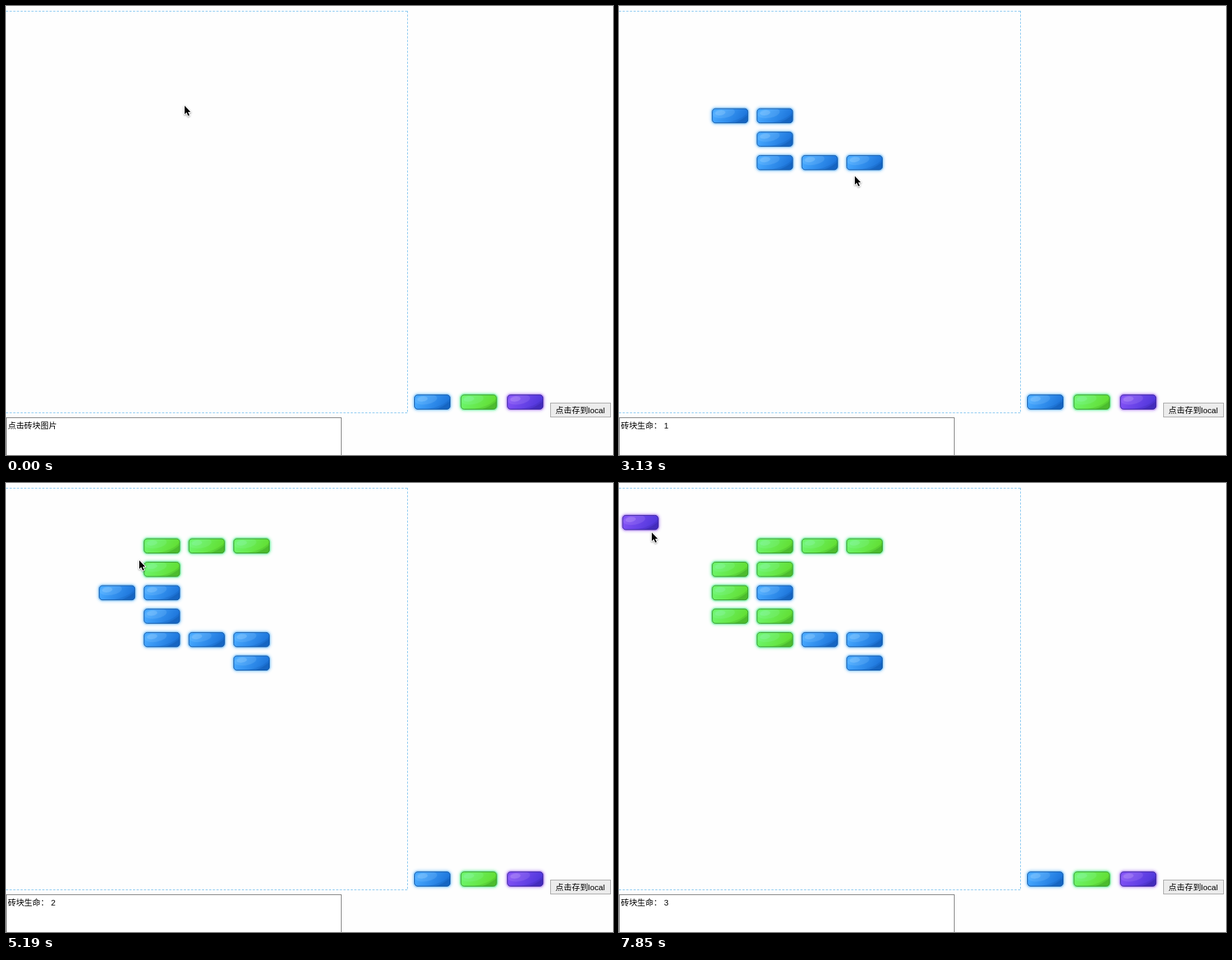
Recreate the animation shown at these times as an HTML page with a canvas. Size 870 by 644 pixels, loop 8000 ms.

```html
<!DOCTYPE html>
<html lang="zh-CN">
<head>
<meta charset="utf-8">
<style>
  html, body { margin: 0; width: 100%; height: 100%; overflow: hidden; background: #fefefe; }
  canvas { display: block; }
</style>
</head>
<body>
<canvas id="stage" width="870" height="644"></canvas>
<script>
const ctx = document.getElementById('stage').getContext('2d');
const LOOP = 8000, TICK = 148, LAST_TICK = 53;
const CELL_W = 64.25, CELL_H = 33.6, TOP = 7.5;
const BRICK_W = 52, BRICK_H = 21.5;
const FONT = '11.7px "Liberation Sans", "Noto Sans CJK SC", "Noto Sans CJK", sans-serif';

const SKINS = {
  blue:   { light: '#46a8ff', dark: '#1c74da', edge: '#0f55a6', glow: '#a9d7fa' },
  green:  { light: '#6cf56a', dark: '#62de32', edge: '#36962a', glow: '#98f4ba' },
  purple: { light: '#8150f5', dark: '#4f36da', edge: '#37219c', glow: '#cdb0f7' }
};

// Each drag: pick a skin at `pick`, then paint every cell crossed from `down` to `up`
const DRAGS = [
  { skin: 'blue', pick: 12, down: 18, up: 22 },
  { skin: 'green', pick: 28, down: 32, up: 39 },
  { skin: 'purple', pick: 45, down: 51.5, up: 53 }
];

// Pointer key points: tick, x, y
const PATH = [
  [0, 255, 142], [2, 180, 150], [7, 647, 545], [9, 601, 581], [10, 618, 576], [12, 618, 576],
  [18, 150, 150], [19, 210, 163], [20, 215, 220], [21, 337, 243], [22, 355, 259],
  [26, 683, 551], [28, 687, 562], [31, 406, 157],
  [32, 375, 90], [34.7, 205, 110], [35, 190, 110], [38, 160, 185], [39, 235, 228],
  [41, 668, 450], [44, 745, 563], [45, 745, 563], [50, 116, 77],
  [51, 75, 38], [52, 30, 55], [53, 46, 70]
];

function pointerAt(tick) {
  const i = Math.max(1, PATH.findIndex(p => p[0] >= tick));
  const [t0, x0, y0] = PATH[i - 1], [t1, x1, y1] = PATH[i];
  const u = (tick - t0) / (t1 - t0);
  return [x0 + (x1 - x0) * u, y0 + (y1 - y0) * u];
}

// Painting trails the pointer slightly
function paintedCells(tick) {
  const cells = new Map();
  for (const { skin, down, up } of DRAGS) {
    const end = Math.min(up, tick - 0.1);
    for (let t = down; t <= end; t += 0.02) {
      const [x, y] = pointerAt(t);
      const col = Math.floor(x / CELL_W), row = Math.floor((y - TOP) / CELL_H);
      cells.set(col + ',' + row, { col, row, skin });
    }
  }
  return cells.values();
}

function blob(cx, cy, rx, ry) {
  ctx.beginPath();
  ctx.ellipse(cx, cy, rx, ry, -0.15, 0, Math.PI * 2);
  ctx.fill();
}

function corner(start, end) {
  ctx.beginPath();
  ctx.moveTo(start, BRICK_H);
  ctx.quadraticCurveTo(42, 18, BRICK_W, end);
  ctx.lineTo(BRICK_W, BRICK_H);
  ctx.fill();
}

function brick(x, y, skin) {
  const { light, dark, edge, glow } = SKINS[skin];
  const body = new Path2D();
  body.roundRect(0.5, 0.5, BRICK_W - 1, BRICK_H - 1, 4.5);
  ctx.save();
  ctx.translate(x, y);

  ctx.shadowColor = ctx.strokeStyle = glow;
  ctx.shadowBlur = 4;
  ctx.lineWidth = 4;
  ctx.stroke(body);
  ctx.shadowColor = 'transparent';

  const g = ctx.createLinearGradient(10, 0, 42, 22);
  g.addColorStop(0, light);
  g.addColorStop(1, dark);
  ctx.fillStyle = g;
  ctx.fill(body);

  ctx.save();
  ctx.clip(body);
  ctx.fillStyle = edge;
  ctx.globalAlpha = 0.2;
  corner(14, 5);
  ctx.globalAlpha = 0.35;
  corner(29, 9);
  ctx.fillStyle = glow;
  ctx.globalAlpha = 0.16;
  blob(17, 7, 16, 7);
  ctx.globalAlpha = 0.28;
  blob(12, 6.5, 7.5, 3.6);
  ctx.restore();

  ctx.strokeStyle = edge;
  ctx.lineWidth = 1;
  ctx.stroke(body);
  ctx.restore();
}

function panel(message) {
  ctx.lineWidth = 1;
  ctx.strokeStyle = '#84c6f0';
  ctx.setLineDash([3.2, 2]);
  for (const [x0, y0, x1, y1] of [[0, 7.5, 576, 7.5], [575.5, 7, 575.5, 584], [0, 583.5, 576, 583.5]]) {
    ctx.beginPath();
    ctx.moveTo(x0, y0);
    ctx.lineTo(x1, y1);
    ctx.stroke();
  }
  ctx.setLineDash([]);

  ctx.fillStyle = '#fff';
  ctx.fillRect(0, 590, 480, 54);
  ctx.strokeStyle = '#7b7b7b';
  ctx.strokeRect(0.5, 590.5, 480, 60);

  ctx.fillStyle = '#ececec';
  ctx.fillRect(780, 570, 87, 20);
  ctx.strokeStyle = '#a6a6a6';
  ctx.strokeRect(780.5, 569.5, 86, 20);

  ctx.font = FONT;
  ctx.fillStyle = '#000';
  ctx.fillText(message, 2.7, 605.7);
  ctx.fillText('点击存到local', 787.6, 583.7);
}

function pointer(x, y) {
  const arrow = new Path2D('M1 1V13.2L3.8 10.6L6 15.6L8 14.7L5.9 9.9H9.6Z');
  ctx.save();
  ctx.translate(x, y);
  ctx.lineJoin = 'round';
  ctx.shadowColor = 'rgba(0,0,0,.4)';
  ctx.shadowBlur = 2.5;
  ctx.shadowOffsetY = 1;
  ctx.strokeStyle = '#fff';
  ctx.lineWidth = 2;
  ctx.stroke(arrow);
  ctx.shadowColor = 'transparent';
  ctx.fillStyle = '#000';
  ctx.fill(arrow);
  ctx.restore();
}

function draw(tick) {
  ctx.fillStyle = '#fefefe';
  ctx.fillRect(0, 0, 870, 644);
  const life = DRAGS.filter(d => tick >= d.pick).length;
  panel(life ? '砖块生命： ' + life : '点击砖块图片');

  Object.keys(SKINS).forEach((skin, i) => brick(585 + i * 66.6, 557.3, skin));
  for (const { col, row, skin } of paintedCells(tick)) {
    brick(4.7 + col * CELL_W, 12.3 + row * CELL_H, skin);
  }
  pointer(...pointerAt(tick));
}

const start = performance.now();
let shown = -1;
function frame() {
  const t = (performance.now() - start) % LOOP;
  const tick = Math.min(LAST_TICK, Math.floor(t / TICK));
  if (tick !== shown) draw(shown = tick);
  requestAnimationFrame(frame);
}
frame();
</script>
</body>
</html>
```
